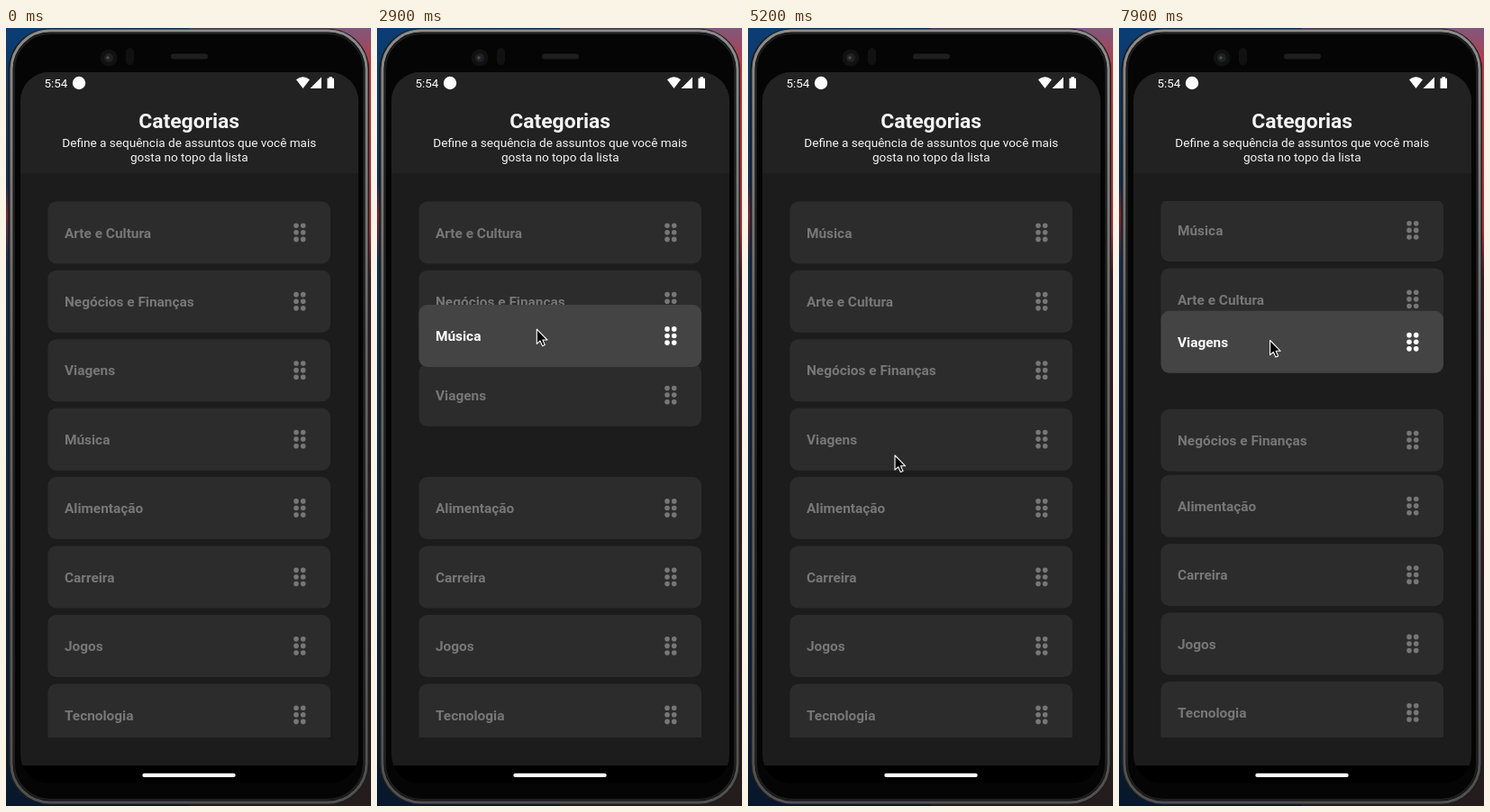
Animation, 405 px wide and 863 px high, one loop 8 s. Source, as an HTML page:

```html
<!DOCTYPE html>
<html lang="pt">
<head>
<meta charset="utf-8">
<title>Categorias</title>
<style>
  html, body { margin: 0; width: 100%; height: 100%; overflow: hidden; background: #050505; }
  svg { display: block; width: 100vw; height: 100vh; }
  text { font-family: Roboto, "Noto Sans", sans-serif; fill: #fff; }
  .title { font-size: 22.9px; font-weight: 700; fill: #f4f4f4; }
  .sub { font-size: 13.58px; fill: #f4f4f4; }
  .clock { font-size: 13.4px; }
  .item text { font-size: 15.4px; font-weight: 700; }
  .mid { text-anchor: middle; }
</style>
</head>
<body>
<svg viewBox="0 0 405 863" preserveAspectRatio="none">
  <defs>
    <linearGradient id="left" x2="0" y2="1">
      <stop offset="0" stop-color="#0b3d74"/>
      <stop offset=".2" stop-color="#10305a"/>
      <stop offset=".24" stop-color="#7a2834"/>
      <stop offset=".3" stop-color="#10305a"/>
      <stop offset=".65" stop-color="#0c2a4c"/>
      <stop offset="1" stop-color="#08172a"/>
    </linearGradient>
    <linearGradient id="right" x2="0" y2="1">
      <stop offset="0" stop-color="#80587c"/>
      <stop offset=".05" stop-color="#b83a46"/>
      <stop offset=".26" stop-color="#a8303a"/>
      <stop offset=".32" stop-color="#3c1c24"/>
      <stop offset="1" stop-color="#241c1c"/>
    </linearGradient>
    <linearGradient id="rim" x2="0" y2="1">
      <stop offset="0" stop-color="#8c8c8c"/>
      <stop offset=".4" stop-color="#666"/>
      <stop offset="1" stop-color="#505050"/>
    </linearGradient>
    <clipPath id="screen"><rect x="16" y="49" width="375" height="789" rx="32"/></clipPath>
    <clipPath id="window"><rect x="46" y="192" width="315" height="595"/></clipPath>
  </defs>

  <rect width="203" height="863" fill="url(#left)"/>
  <rect x="203" width="202" height="863" fill="url(#right)"/>
  <rect x="2.5" y=".5" width="400.5" height="861" rx="46" fill="#1c1c1c"/>
  <rect x="6" y="3" width="394" height="856" rx="43" fill="#050505" stroke="url(#rim)" stroke-width="3"/>
  <rect x="9" y="6" width="388" height="850" rx="40" fill="#050505" stroke="#1e1e1e" stroke-width="2"/>
  <circle cx="114" cy="33" r="9.5" fill="#111"/>
  <circle cx="114" cy="33" r="5" fill="#202124"/>
  <circle cx="113" cy="33" r="1.7" fill="#4a4d50"/>
  <rect x="133" y="22" width="9" height="19" rx="4.5" fill="#111"/>
  <rect x="183" y="28.5" width="41" height="6" rx="3" fill="#1e1e1e"/>

  <g clip-path="url(#screen)">
    <rect x="16" y="49" width="375" height="770" fill="#1c1c1c"/>
    <rect x="16" y="49" width="375" height="112" fill="#222"/>
    <rect x="16" y="818" width="375" height="20" fill="#000"/>
  </g>
  <rect x="151.3" y="826.8" width="103.4" height="4.2" rx="2.1" fill="#fff"/>

  <text class="clock" x="42.5" y="66">5:54</text>
  <g fill="#fff">
    <circle cx="81" cy="61" r="7.2"/>
    <path d="M322 57.3Q329.5 51.3 337 57.3L329.5 67Z"/>
    <path d="M350 54.5V67H337.5Z"/>
    <path d="M356.5 55.7H358.5V54.3H362V55.7H364V67H356.5Z"/>
  </g>
  <text class="title mid" x="203.2" y="110.8">Categorias</text>
  <text class="sub mid" x="203.3" y="132">Define a sequência de assuntos que você mais</text>
  <text class="sub mid" x="203.3" y="148">gosta no topo da lista</text>

  <g clip-path="url(#window)"><g id="list"></g></g>
  <path id="cursor" d="M0 0V16.2L3.7 12.8L6.3 18.6L9 17.4L6.5 11.8H11.6Z" fill="#000" stroke="#fff" stroke-width="1.1" stroke-linejoin="round"/>
</svg>
<script>
const LOOP = 8000, STEP = 100, PITCH = 76.43, TOP = 192.4, DIM = 0.4, FADE = 300, GAIN = 1.025;
const names = ["Arte e Cultura", "Negócios e Finanças", "Viagens", "Música",
  "Alimentação", "Carreira", "Jogos", "Tecnologia"];
const list = document.getElementById("list");
const cursor = document.getElementById("cursor");

// Stops of the pointer: time, x, y.
const stops = [
  [400, 204, 8], [1200, 170, 408], [1600, 174, 453], [2200, 173, 450],
  [2400, 173, 410.5], [2600, 174, 408], [3300, 182.4, 220.5], [4300, 185.4, 208.5],
  [5200, 163, 474], [5900, 162, 462], [7100, 162, 460.5], [7500, 166.8, 366.5], [7900, 167.6, 346.5]
];

// "passes" holds the moments at which the dragged card displaces each card above it.
const drags = [
  { name: "Música", slot: 3, press: 1800, drop: 4300, grab: 446, lag: 0, passes: [2850, 3000, 3400] },
  { name: "Viagens", slot: 3, press: 6800, drop: LOOP, grab: 455, lag: 140, passes: [7500] }
];

const ramp = (t, from, to) => Math.min(1, Math.max(0, (t - from) / (to - from)));
const smooth = p => p * p * (3 - 2 * p);

// Damped swing from 0 to 1.
function spring(ms) {
  const s = Math.max(0, ms) / 1000;
  return 1 - Math.exp(-6 * s) * Math.cos(10.5 * s);
}

function pointer(t) {
  let [, x, y] = stops[0];
  for (let i = 1; i < stops.length; i++) {
    const p = smooth(ramp(t, stops[i - 1][0], stops[i][0]));
    x += (stops[i][1] - x) * p;
    y += (stops[i][2] - y) * p;
  }
  return { x, y };
}

function makeItem(name) {
  const node = document.createElementNS("http://www.w3.org/2000/svg", "g");
  const dots = [-7.6, 0, 7.6].flatMap(dy => [322, 329.7].map(x =>
    `<circle cx="${x}" cy="${34.4 + dy}" r="2.8" fill="#fff"/>`)).join("");
  node.setAttribute("class", "item");
  node.innerHTML = `<rect x="46.4" width="313.6" height="69" rx="9.5" fill="#444"/>
    <text x="65" y="40.2">${name}</text>${dots}`;
  list.append(node);
  return node;
}

const items = names.map(name => ({ name, node: makeItem(name) }));

// Applies one drag to the slots, in place, and reorders the names.
function applyDrag(drag, t, order, place) {
  const { name, slot, press, drop, grab, lag, passes } = drag;
  const held = Math.min(0, pointer(t - lag).y - grab) * GAIN;
  const landed = -passes.length * PITCH;
  if (t >= press) place[name] += held + (landed - held) * ramp(t, drop, drop + 100);
  passes.forEach((time, i) => place[order[slot - 1 - i]] += PITCH * spring(t - time));
  order.splice(slot - passes.length, 0, order.splice(slot, 1)[0]);
}

function draw(t) {
  const order = [...names], place = {}, glow = {};
  const scroll = -2.4 * spring(t - 5300);
  names.forEach((name, i) => place[name] = TOP + i * PITCH + scroll);
  for (const drag of drags) {
    applyDrag(drag, t, order, place);
    const { name, press, drop } = drag;
    const lit = ramp(t, press, press + FADE) - ramp(t, drop + 100, drop + 100 + FADE);
    glow[name] = DIM + (1 - DIM) * lit;
  }

  const active = t < drags[1].press ? drags[0] : drags[1];
  const front = items.find(item => item.name === active.name).node;
  if (list.lastChild !== front) list.append(front);
  for (const { name, node } of items) {
    node.setAttribute("transform", `translate(0 ${place[name].toFixed(2)})`);
    node.setAttribute("opacity", glow[name] ?? DIM);
  }

  const { x, y } = pointer(t);
  cursor.setAttribute("visibility", t < stops[0][0] ? "hidden" : "visible");
  cursor.setAttribute("transform", `translate(${x} ${y})`);
}

const start = performance.now();
function tick() {
  const t = (performance.now() - start) % LOOP;
  draw(Math.floor(t / STEP) * STEP);
  requestAnimationFrame(tick);
}
tick();
</script>
</body>
</html>
```
